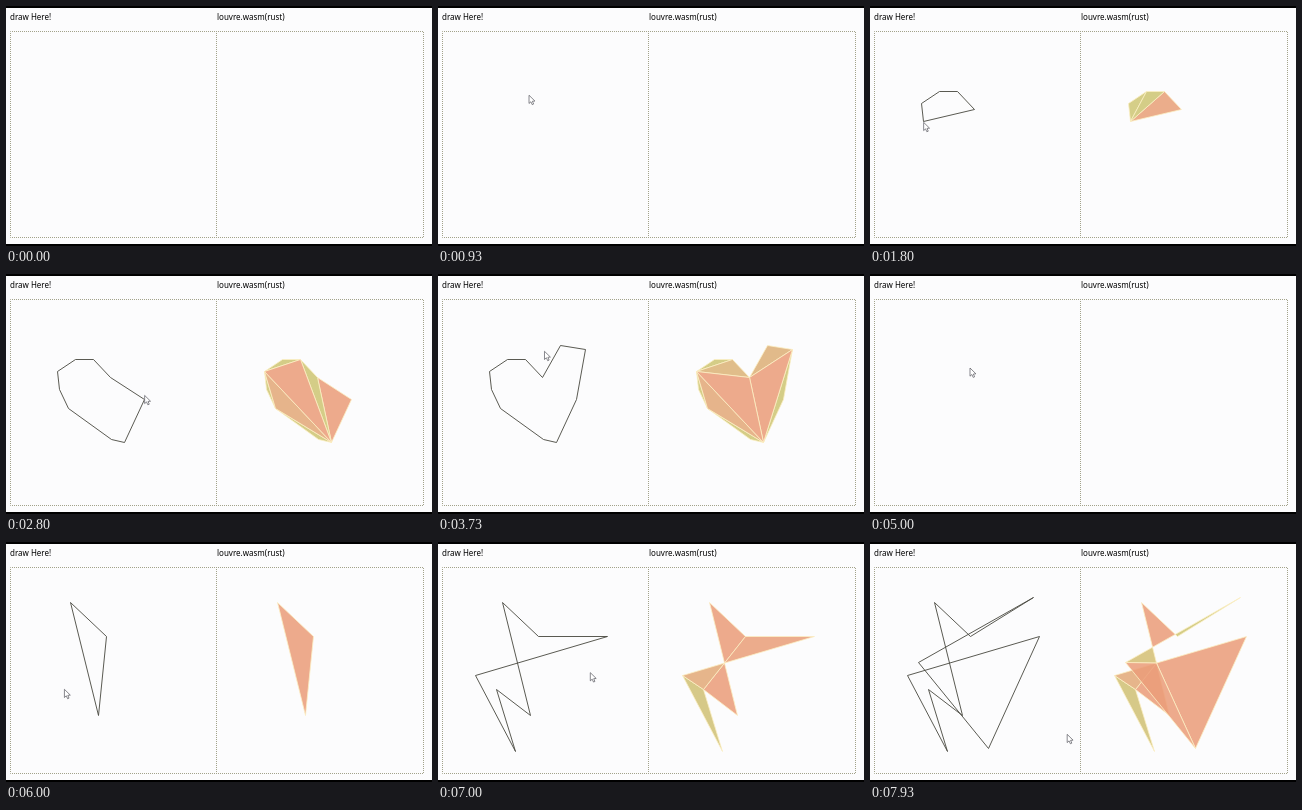
An HTML page with a canvas for the animation above (8 s loop, 426 by 240 pixels).

```html
<!DOCTYPE html>
<html lang="en">
<head>
<meta charset="utf-8">
<title>Polygon triangulation</title>
<style>
  html, body { margin: 0; width: 100%; height: 100%; overflow: hidden; background: #fcfcfd; }
  canvas { display: block; width: 100vw; height: 100vh; }
</style>
</head>
<body>
<canvas id="stage" width="426" height="240"></canvas>
<script>
const ctx = document.getElementById('stage').getContext('2d');
const LOOP = 8000, CLEAR_AT = 4330, OFFSET = 207;
const THIN = [206, 198, 116], FAT = [236, 158, 122];

// Corners are clicked one per step; afterwards the pointer heads for "leave".
const heart = {
  start: 760, step: 250, leave: [107, 76],
  corners: [[104, 103], [87, 85], [69, 85], [51, 97], [53, 115], [62, 134],
            [105, 165], [118, 168], [138, 125], [147, 75], [122, 71]]
};
const star = {
  start: 5150, step: 290, leave: [217, 272],
  corners: [[100, 94], [64, 60], [92, 173], [58, 147], [77, 209],
            [37, 133], [169, 94], [118, 206], [48, 120], [163, 55]]
};

// The pointer hovers over the first corner for one step before clicking it.
function pointerStops({ start, step, corners, leave }) {
  return [corners[0], ...corners, leave].map((at, i) => ({ time: start + (i - 1) * step, at }));
}
const stops = [{ time: 260, at: [150, 246] }, ...pointerStops(heart), ...pointerStops(star)];

const mix = (a, b, p) => a.map((v, i) => v + (b[i] - v) * p);
const clamp = p => Math.min(1, Math.max(0, p));
const ease = p => p * p * (3 - 2 * p);

function pointerAt(t) {
  const i = stops.findIndex(s => s.time > t);
  if (i < 1) return null;
  const a = stops[i - 1], b = stops[i];
  return mix(a.at, b.at, ease((t - a.time) / (b.time - a.time)));
}

function placed({ start, step, corners }, t) {
  return corners.slice(0, Math.max(0, Math.floor((t - start) / step) + 1));
}

const cross = (a, b, c) => (b[0] - a[0]) * (c[1] - a[1]) - (b[1] - a[1]) * (c[0] - a[0]);

function crossing(a, b, c, d) {
  const ca = cross(c, d, a), cb = cross(c, d, b);
  if (ca * cb >= -1e-6 || cross(a, b, c) * cross(a, b, d) >= -1e-6) return null;
  return mix(a, b, ca / (ca - cb));
}

// Cuts a self-crossing outline into simple loops.
function simpleLoops(ring) {
  const n = ring.length;
  for (let i = 0; i < n; i++) {
    for (let j = i + 2; j < n; j++) {
      const p = crossing(ring[i], ring[i + 1], ring[j], ring[(j + 1) % n]);
      if (!p) continue;
      const inner = [p, ...ring.slice(i + 1, j + 1)];
      const outer = [p, ...ring.slice(j + 1), ...ring.slice(0, i + 1)];
      return [...simpleLoops(inner), ...simpleLoops(outer)];
    }
  }
  return [ring];
}

function isEar(tri, ring) {
  const [a, b, c] = tri;
  if (cross(a, b, c) <= 0) return false;
  return !ring.some(p => !tri.includes(p) &&
    cross(a, b, p) >= 0 && cross(b, c, p) >= 0 && cross(c, a, p) >= 0);
}

// Ear clipping that skips one corner after every cut.
function triangulate(loop) {
  const area = loop.reduce((sum, p, i) => sum + cross([0, 0], p, loop[(i + 1) % loop.length]), 0);
  const ring = area > 0 ? [...loop] : [...loop].reverse();
  const tris = [];
  let i = ring.length - 1, misses = 0;
  while (ring.length > 2 && misses <= ring.length) {
    const n = ring.length;
    const tri = [ring[(i + n - 1) % n], ring[i], ring[(i + 1) % n]];
    if (isEar(tri, ring)) {
      tris.push(tri);
      ring.splice(i, 1);
      i = ((i % (n - 1)) + 1) % (n - 1);
      misses = 0;
    } else {
      i = (i + 1) % n;
      misses++;
    }
  }
  return tris;
}

function trace(points) {
  ctx.beginPath();
  points.forEach(([x, y], i) => ctx[i ? 'lineTo' : 'moveTo'](x, y));
  ctx.closePath();
}

function stroke(colour, width) {
  ctx.strokeStyle = colour;
  ctx.lineWidth = width;
  ctx.stroke();
}

// Slivers are yellowish, wide triangles are orange.
function triangleColour([a, b, c]) {
  const dist = (p, q) => Math.hypot(p[0] - q[0], p[1] - q[1]);
  const inradius = Math.abs(cross(a, b, c)) / (dist(a, b) + dist(b, c) + dist(c, a));
  return `rgb(${mix(THIN, FAT, clamp((inradius - 5.5) / 4)).map(Math.round)})`;
}

function drawShape(points) {
  if (points.length < 2) return;
  ctx.save();
  ctx.translate(0.5, 0.5);
  trace(points);
  stroke('#48483f', 0.9);
  ctx.translate(OFFSET, 0);
  for (const tri of simpleLoops(points).flatMap(triangulate)) {
    trace(tri);
    ctx.globalAlpha = 0.86;
    ctx.fillStyle = triangleColour(tri);
    ctx.fill();
    ctx.globalAlpha = 1;
    stroke('#fbefc4', 0.8);
  }
  ctx.restore();
}

function drawPage() {
  ctx.fillStyle = '#fcfcfd';
  ctx.fillRect(0, 0, 426, 240);
  ctx.fillStyle = '#000';
  ctx.fillRect(0, 0, 426, 2);
  ctx.fillRect(0, 238, 426, 2);
  ctx.font = '8px "Noto Sans", "Open Sans", sans-serif';
  ctx.fillText('draw Here!', 4, 14);
  ctx.fillText('louvre.wasm(rust)', 211, 14);
  ctx.setLineDash([1, 1]);
  ctx.lineDashOffset = 0.5;
  ctx.beginPath();
  ctx.rect(4.5, 25.5, 413, 206);
  ctx.moveTo(210.5, 25.5);
  ctx.lineTo(210.5, 231.5);
  stroke('#a2a28a', 1);
  ctx.setLineDash([]);
}

function drawPointer([x, y]) {
  const arrow = [[0, 0], [0, 8.2], [1.9, 6.5], [3.2, 9.4], [4.6, 8.8], [3.4, 6], [5.9, 5.8]];
  trace(arrow.map(([ax, ay]) => [x + ax, y + ay]));
  ctx.fillStyle = '#fff';
  ctx.fill();
  stroke('#55555c', 0.7);
}

function render(t) {
  drawPage();
  ctx.lineJoin = 'bevel';
  drawShape(placed(t < CLEAR_AT ? heart : star, t));
  const pointer = pointerAt(t);
  if (pointer) drawPointer(pointer);
}

const begin = performance.now();
function tick() {
  render((performance.now() - begin) % LOOP);
  requestAnimationFrame(tick);
}
tick();
</script>
</body>
</html>
```
